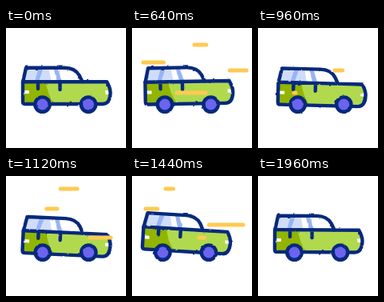
An HTML page for the animation above (2 s loop, 150 by 150 pixels).

```html
<!DOCTYPE html>
<html lang="en">
<head>
<meta charset="utf-8">
<title>Driving car</title>
<style>
  html, body { margin: 0; width: 100%; height: 100%; overflow: hidden; background: #fff; }
  svg { display: block; width: 100vw; height: 100vh; }
  .ink { stroke: #07297c; stroke-width: 4.4; stroke-linecap: round; stroke-linejoin: round; }
  .streak { stroke: #ffca52; stroke-width: 5; stroke-linecap: round; }
</style>
</head>
<body>
<svg viewBox="0 0 150 150">
  <defs>
    <path id="shell" d="M25 49.7H73Q86 49.7 91.5 59L95.5 67.2H126Q130.5 75 130.5 81Q130 95 121 95H24Q21 95 21 92V68Z"/>
    <clipPath id="inside"><use href="#shell"/></clipPath>
    <filter id="rough" filterUnits="userSpaceOnUse" x="0" y="35" width="150" height="85"
            color-interpolation-filters="sRGB">
      <feTurbulence type="fractalNoise" baseFrequency=".2" seed="4"/>
      <feDisplacementMap in="SourceGraphic" scale="2.4" xChannelSelector="R" yChannelSelector="G"/>
    </filter>
  </defs>
  <g id="back"></g>
  <g filter="url(#rough)">
    <g id="body">
      <g clip-path="url(#inside)">
        <path fill="#d0ddfa" d="M20 48H53L57 68H20Z"/>
        <path fill="#fff" d="M53 48H98V68H57Z"/>
        <path fill="#97b4f5" d="M41 49H47L41 67H36ZM59 49H64L70 67H64Z"/>
        <path fill="#b1d94e" d="M20 67H134V97H20Z"/>
        <path fill="#91b500" d="M20 67H50Q51 82 61 95H20Z"/>
        <path fill="#fff" d="M22 78H29V82H22ZM124 78H131V82H124Z"/>
      </g>
      <g class="ink" fill="none">
        <use href="#shell"/>
        <path d="M21 67.2H95M40 68V76M67.5 68V77"/>
      </g>
    </g>
    <g id="wheels" class="ink" fill="#6c63ef">
      <circle cx="45.5" cy="95.6" r="9.2"/>
      <circle cx="103" cy="95.6" r="9.2"/>
    </g>
  </g>
  <g id="front"></g>
</svg>
<script>
const LOOP = 2000, STEP = 40, TURN = 2 * Math.PI;
const $ = id => document.getElementById(id);
const ease = p => (1 - Math.cos(Math.PI * Math.min(1, Math.max(0, p)))) / 2;
const tween = (t, from, to, start, end) => from + (to - from) * ease((t - start) / (end - start));

// The car drops back, surges forward, drops back again and settles.
const shift = t =>
  tween(t, 0, -12, 0, 470) + tween(t, 0, 17.3, 470, 840) +
  tween(t, 0, -12.5, 840, 1480) + tween(t, 0, 7.2, 1480, 1840);
const bounce = t => Math.sin(Math.PI * t / LOOP) * (1.3 + 2.3 * Math.cos(TURN * (t - 340) / 780));
const tilt = t => 0.9 * (1 - Math.cos(TURN * t / LOOP)) - 2.5 * Math.sin(TURN * t / LOOP);

// Each streak grows leftwards from its right end, then its tail catches up.
const LENGTH = 47, HEAD = 280, DELAY = 190, TAIL = 370;

function streak(layer, y, right, start) {
  const line = document.createElementNS('http://www.w3.org/2000/svg', 'line');
  const set = (name, value) => line.setAttribute(name, value);
  const tailStart = start + DELAY, end = tailStart + TAIL;
  set('class', 'streak');
  set('y1', y);
  set('y2', y);
  $(layer).append(line);
  return t => {
    set('visibility', t > start && t < end ? 'visible' : 'hidden');
    set('x1', tween(t, right, right - LENGTH, start, start + HEAD));
    set('x2', tween(t, right, right - LENGTH, tailStart, end));
  };
}

const streaks = [
  streak('back', 21, 125, 220),
  streak('back', 43, 61, 275),
  streak('back', 53, 143, 510),
  streak('front', 81, 92, 450),
  streak('back', 16, 89, 990),
  streak('back', 41, 64, 1020),
  streak('back', 61, 141, 1200),
  streak('front', 77, 131, 970)
];

function draw(now) {
  const t = Math.floor(now % LOOP / STEP) * STEP;
  const x = shift(t);
  $('body').setAttribute('transform', `translate(${x} ${bounce(t)}) rotate(${tilt(t)} 75 75)`);
  $('wheels').setAttribute('transform', `translate(${x} 0)`);
  streaks.forEach(update => update(t));
}

const began = performance.now();
function tick() {
  draw(performance.now() - began);
  requestAnimationFrame(tick);
}
tick();
</script>
</body>
</html>
```
